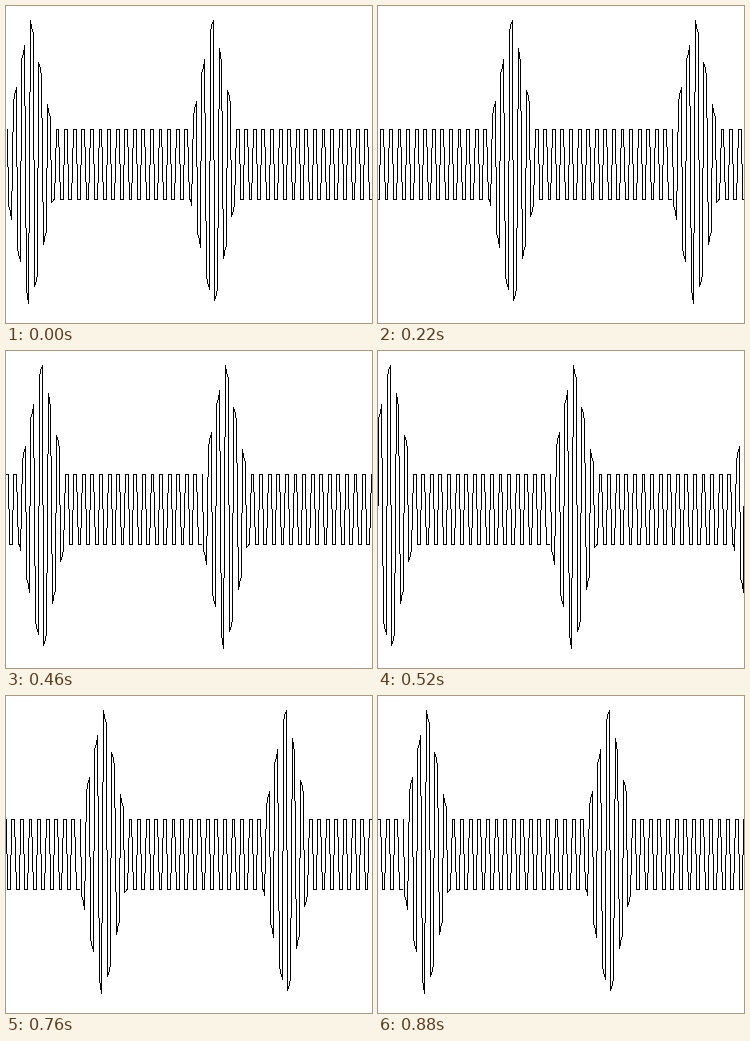
Animation, 366 px wide and 317 px high, one loop 0.94 s. Source, as an HTML page:

```html
<!DOCTYPE html>
<html lang="en">
<head>
<meta charset="utf-8">
<title>Travelling pulses</title>
<style>
  html, body { margin: 0; width: 100%; height: 100%; overflow: hidden; background: #fff; }
  svg { display: block; width: 366px; height: 317px; }
</style>
</head>
<body>
<svg viewBox="0 0 366 317" shape-rendering="crispEdges">
  <defs><path id="wave" fill="#000"/></defs>
  <g id="train">
    <use href="#wave"/>
    <use href="#wave" x="366"/>
  </g>
</svg>
<script>
const WIDTH = 366, STEPS = 15, LOOP = 940, HOLD = 100, TICK = 60;
const SAMPLES = 256, LEFT = 1, MID = 157.5;
const BASE = 35, PEAK = 145, SLOPE = 7, APEX = 15.786;

// Two triangular pulses per 256 samples, rising out of a constant carrier level
function level(i) {
  const half = SAMPLES / 2;
  return Math.max(BASE, PEAK - SLOPE * Math.abs(i % half - APEX));
}

// Square carrier: three samples high, three samples low
function sample(i) {
  const sign = (i + 2) % 6 < 3 ? -1 : 1;
  return [LEFT + Math.round(i * WIDTH / SAMPLES), Math.round(MID + sign * level(i))];
}

// One-pixel line made of a vertical run per column
function line([x0, y0], [x1, y1]) {
  const dx = x1 - x0, dy = y1 - y0;
  const at = u => y0 + Math.round(dy * Math.min(1, Math.max(0, u / dx)));
  let d = "";
  for (let j = 0; j <= dx; j++) {
    const a = at(j - 0.5);
    let b = at(j + 0.5);
    if (j < dx && a !== b) b -= Math.sign(dy);
    d += `M${x0 + j} ${Math.min(a, b)}h1v${Math.abs(b - a) + 1}h-1z`;
  }
  return d;
}

let path = "";
for (let i = 0; i < SAMPLES - 1; i++) path += line(sample(i), sample(i + 1));
document.getElementById("wave").setAttribute("d", path);

const train = document.getElementById("train");

function draw(ms) {
  const t = ms % LOOP;
  const step = t < HOLD ? 0 : 1 + Math.floor((t - HOLD) / TICK);
  const shift = Math.round(step * WIDTH / STEPS);
  train.setAttribute("transform", `translate(${-shift} 0)`);
}

const start = performance.now();
function tick() {
  draw(performance.now() - start);
  requestAnimationFrame(tick);
}
tick();
</script>
</body>
</html>
```
